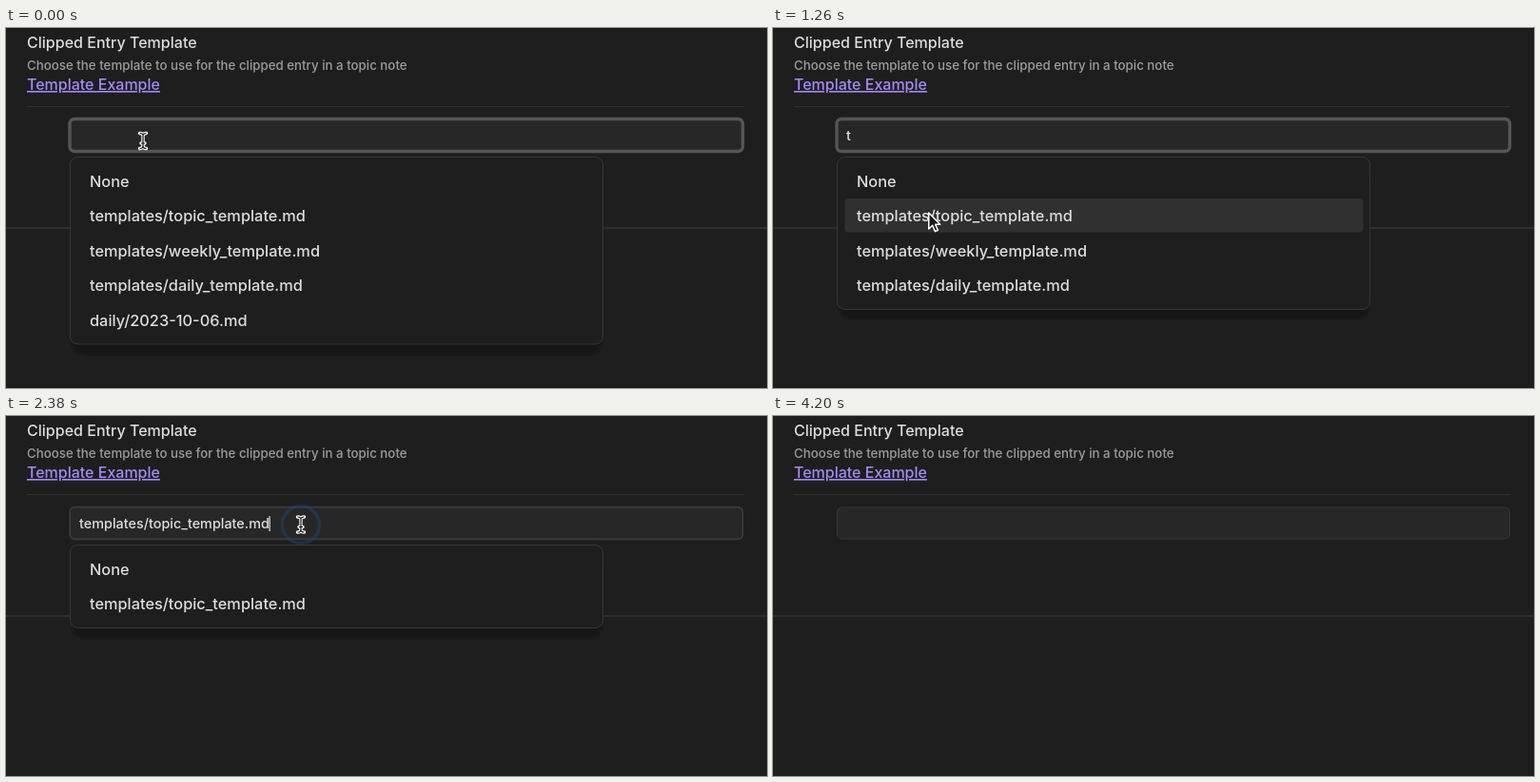
Animation, 800 px wide and 378 px high, one loop 4270 ms. Source, as an HTML page:

```html
<!DOCTYPE html>
<html lang="en">
<head>
<meta charset="utf-8">
<style>
  html, body { margin: 0; width: 100%; height: 100%; overflow: hidden; background: #1e1e1e; }
  svg { display: block; width: 800px; height: 378px; font: 500 16.35px Inter, "Open Sans", sans-serif; fill: #dedede; }
</style>
</head>
<body>
<svg viewBox="0 0 800 378">
  <defs>
    <filter id="soft" x="-5%" y="-20%" width="110%" height="140%"><feGaussianBlur stdDeviation="1"/></filter>
    <path id="beam" fill="none" d="M-3.5 -8Q0 -8 0 -5.5Q0 -8 3.5 -8M0 -5.5V5.5M-3.5 8Q0 8 0 5.5Q0 8 3.5 8M-2 2.5H2"/>
  </defs>
  <text x="22" y="21" font-size="16.05">Clipped Entry Template</text>
  <text x="22" y="43.5" font-size="13.3" fill="#9c9c9c">Choose the template to use for the clipped entry in a topic note</text>
  <text x="22" y="65" font-size="16" fill="#a68af9" text-decoration="underline">Template Example</text>
  <path d="M22 82.5H775" stroke="#303030"/>
  <path d="M0 210H800" stroke="#333" stroke-width="1.6"/>

  <rect x="67.5" y="96" width="707" height="33" rx="5" fill="#272727" stroke="#363636"/>
  <rect id="focus" x="67" y="95.5" width="707.5" height="34" rx="5" fill="none" stroke="#555"/>
  <text id="value" x="77" y="118" font-size="14.4"></text>
  <path id="caret" d="M0 105V121" stroke="#e4e4e4" stroke-width="1.2"/>

  <g id="list">
    <rect id="shade" x="69" y="150" width="558" rx="14" fill="#181818" filter="url(#soft)"/>
    <rect id="panel" x="67.5" y="135.5" width="560" rx="8" fill="#1e1e1e" stroke="#373737"/>
    <rect id="hover" x="75.5" width="545" height="35.5" rx="4" fill="#303030"/>
    <g id="items"></g>
  </g>

  <circle id="ring" fill="none" stroke="#1f4679" stroke-width="3.5"/>
  <g id="arrow">
    <path d="M0 0V17L4 13.2L6.7 19.6L9.6 18.3L6.9 12.2H12Z" fill="#1a1a1a" stroke="#fff" stroke-width="1.5" stroke-linejoin="round"/>
  </g>
  <g id="ibeam">
    <use href="#beam" stroke="#fff" stroke-width="3.4" stroke-linecap="round"/>
    <use href="#beam" stroke="#111" stroke-width="1.2"/>
  </g>
</svg>
<script>
const LOOP = 4270, FRAME = 70, ROW = 36.5;
const $ = id => document.getElementById(id);
const set = (id, attrs) => { for (const k in attrs) $(id).setAttribute(k, attrs[k]); };
const show = (el, on) => { el.style.display = on ? "" : "none"; };
const clamp = v => Math.max(0, Math.min(1, v));

const topic = "templates/topic_template.md";
const names = ["None", topic, "templates/weekly_template.md", "templates/daily_template.md", "daily/2023-10-06.md"];
const rows = names.map((name, i) => {
  const row = document.createElementNS("http://www.w3.org/2000/svg", "text");
  row.textContent = name;
  row.setAttribute("x", 88);
  row.setAttribute("y", 166.8 + ROW * i);
  return $("items").appendChild(row);
});

// Pointer stops: time, x, y
const path = [
  [0, 144, 118.5], [560, 144, 118.5], [910, 153, 175.5], [1120, 153, 175.5], [1330, 167.5, 200.5],
  [1680, 167.5, 200.5], [2240, 310, 114], [2520, 310, 114], [2790, 251, 148],
  [3220, 225, 155.5], [3640, 225, 155.5], [3920, 216, 212], [4180, 205, 390], [LOOP, 205, 390]
];
const clicks = [1390, 2360, 3420];

// Value of the last stop reached
const step = (t, stops) => stops.filter(s => t >= s[0]).pop()[1];

function pointer(t) {
  const i = path.findIndex(p => p[0] > t);
  const [t0, x0, y0] = path[i - 1], [t1, x1, y1] = path[i];
  const u = (t - t0) / (t1 - t0), e = u * u * (3 - 2 * u);
  return [x0 + (x1 - x0) * e, y0 + (y1 - y0) * e];
}

function draw(t) {
  const [x, y] = pointer(t);
  const text = step(t, [[0, ""], [490, "t"], [1400, topic], [3430, ""]]);
  const count = step(t, [[0, 5], [490, 4], [1400, 0], [2380, 2], [3430, 0]]);

  $("value").textContent = text;
  show($("caret"), (t >= 490 && t < 910) || (t >= 2380 && t < 2870));
  set("caret", { transform: `translate(${77.3 + $("value").getComputedTextLength()} 0)` });

  const focus = t < 2000 ? clamp((1460 - t) / 70) : Math.min(clamp((t - 2360) / 140), clamp((3490 - t) / 70));
  set("focus", { "stroke-width": 1 + 2.4 * focus, opacity: clamp(focus * 3) });

  show($("list"), count);
  const height = ROW * count + 14;
  set("panel", { height });
  set("shade", { height: height - 4 });
  rows.forEach((row, i) => show(row, i < count));
  const over = Math.floor((y - 143) / ROW);
  show($("hover"), over >= 0 && over < count);
  set("hover", { y: 142.5 + ROW * over });

  const age = t - (clicks.filter(c => c <= t).pop() ?? -LOOP);
  const grow = clamp(age / 70), fade = clamp((330 - age) / 150);
  const inField = y > 94 && y < 131;
  set("ring", {
    cx: x + (inField ? 0 : 1.3), cy: y + (inField ? 0 : 2.5),
    r: 18 + 5.5 * Math.min(grow, fade),
    opacity: Math.min(0.25 + 0.75 * grow, fade)
  });

  show($("ibeam"), inField);
  show($("arrow"), !inField);
  for (const id of ["ibeam", "arrow"]) set(id, { transform: `translate(${x} ${y})` });
}

const start = performance.now();
function tick() {
  const t = (performance.now() - start) % LOOP;
  draw(Math.floor(t / FRAME) * FRAME);
  requestAnimationFrame(tick);
}
tick();
</script>
</body>
</html>
```
